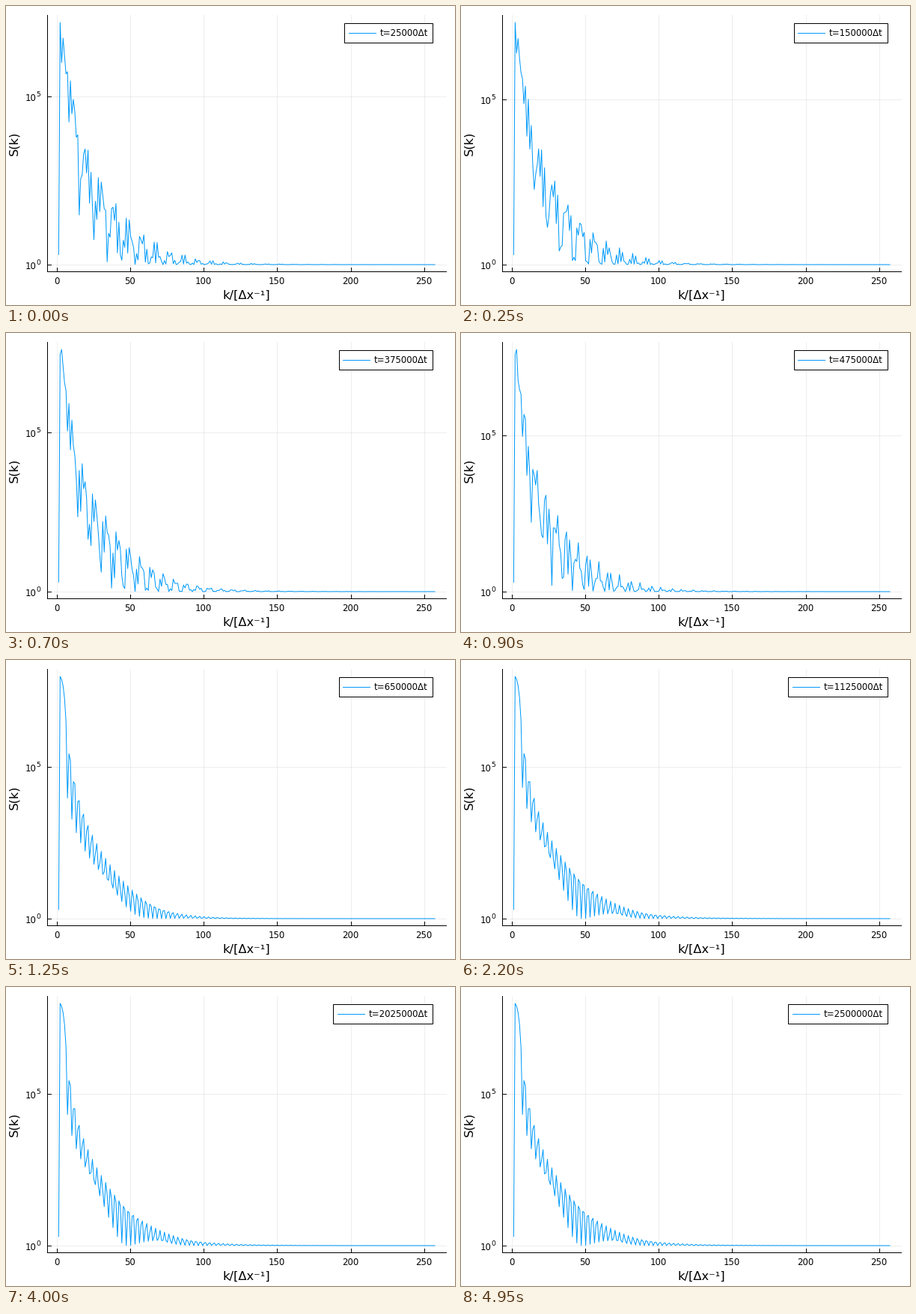
These frames come from a looping animation (600 by 400 pixels, 5 s). A matplotlib script:

```python
import numpy as np
import matplotlib.pyplot as plt
from matplotlib.animation import FuncAnimation
from matplotlib.patches import Rectangle

FRAMES, STEP = 100, 25000
LEFT, RIGHT, TOP, BOTTOM = 55.5, 588.5, 12, 355.5
BASE, PEAK = 346, 22            # y of S = 1 and of the largest S
SMALL, LARGE = 8.5, 11.7        # font sizes
PX = 0.72                       # one pixel in points
BLUE = "#009afa"

k = np.arange(1, 258)
m = np.arange(1, 257)           # modes above the mean
log_m = np.log10(m)


def log_spectrum(power, peak):
    """log10 S for mode powers scaled so that the largest is 10**peak."""
    power = power * 10 ** peak / power.max()
    return np.log10(1 + np.concatenate([[1], power]))


def cluster(i):
    """Drops that widen and approach each other: lobes cut by fast teeth."""
    width = 9.4 - 0.0627 * i - 0.00353 * i ** 2
    gap = 0.577 - 0.0031 * i - 0.000506 * i ** 2
    phase = 0.577 - 0.0092 * i - 0.00215 * i ** 2
    lobes = np.sin(np.pi * (m / width - 0.553 - 0.0045 * i)) ** 2
    teeth = np.cos(np.pi * (m * gap - phase)) ** 2
    lobes += 0.01 + np.exp(-(m / 6) ** 2)
    teeth += 0.03 + np.exp(-m ** 2)
    peak = 7.2 + 0.031 * i
    fall = 10.88 - 0.0128 * i - 5.4 * log_m
    envelope = 1 / (10 ** -peak + 10 ** -fall)
    return log_spectrum(envelope * lobes * teeth, peak)


def droplet(settled):
    """A single raised-cosine drop with a slightly rough edge."""
    u = m / (3.045 + 0.02 * settled)
    bump = np.sin(np.pi * u) / (u * (1 - u ** 2))
    edge = 0.76 * log_m * m ** 2 / (m ** 2 + 6)
    damping = 0.003 * (1 - settled) * m
    return log_spectrum(bump ** 2 * 10 ** (edge - damping), 8)


def log_s(i):
    merge = np.clip((i - 18) / 6, 0, 1)
    settled = np.clip((i - 25) / 17, 0, 1)
    if merge == 1:
        return droplet(settled)
    return (1 - merge) * cluster(i) + merge * droplet(settled)


def x_px(value):
    return 68.4 + 1.9636 * value


fig = plt.figure(figsize=(6, 4), dpi=100, facecolor="white")
plt.rcParams["font.family"] = "DejaVu Sans"
ax = fig.add_axes([0, 0, 1, 1])
ax.set_xlim(0, 600)
ax.set_ylim(400, 0)
ax.axis("off")


def stroke(xs, ys, color="black", **kw):
    return ax.plot(xs, ys, color=color, lw=PX, **kw)[0]


def rule(x0, y0, x1, y1, **kw):
    """Straight line; the half pixel offsets the renderer's snapping."""
    return stroke([x0 - 0.5, x1 - 0.5], [y0 - 0.5, y1 - 0.5], **kw)


def grid_rule(x0, y0, x1, y1):
    return rule(x0, y0, x1, y1, alpha=0.065, zorder=1)


def label(x, y, text, size=SMALL, **kw):
    return ax.text(x, y, text, fontsize=size, **kw)


def power_label(exponent, y):
    return (label(41, y + 5.5, "10", ha="right"),
            label(40.5, y - 0.5, exponent, 6.6))


for value in range(0, 251, 50):
    x = x_px(value)
    grid_rule(x, TOP, x, BOTTOM)
    rule(x, BOTTOM - 5, x, BOTTOM)
    label(x - 0.8, 371.5, str(value), ha="center")

grid_rule(LEFT, BASE, RIGHT, BASE)
rule(LEFT, BASE, LEFT + 5, BASE)
power_label("0", BASE)

grid5 = grid_rule(LEFT, BASE, RIGHT, BASE)
tick5 = rule(LEFT, BASE, LEFT + 5, BASE)
ten5, exp5 = power_label("5", BASE)

rule(LEFT, TOP, LEFT, BOTTOM)
rule(LEFT, BOTTOM, RIGHT, BOTTOM)
label(321.5, 392, "k/[Δx⁻¹]", LARGE, ha="center")
label(18, 184, "S(k)", LARGE, rotation=90, ha="right", va="center")

curve = stroke(x_px(k), np.full(k.size, BASE), BLUE, zorder=3,
               solid_joinstyle="round")

box = Rectangle((452, 23), 118, 25.5, fc="white", ec="black", lw=PX,
                zorder=4)
ax.add_patch(box)
key = rule(458, 36.5, 494, 36.5, color=BLUE, zorder=5)
caption = label(499.5, 40.5, "", zorder=5)


def draw(i):
    logs = log_s(i)
    decade = (BASE - PEAK) / logs.max()
    curve.set_ydata(BASE - decade * logs)

    y5 = BASE - 5 * decade
    for line in (grid5, tick5):
        line.set_ydata([y5 - 0.5, y5 - 0.5])
    ten5.set_y(y5 + 5.5)
    exp5.set_y(y5 - 0.5)

    steps = str(STEP * (i + 1))
    shift = 7.5 * (len(steps) - 5)
    box.set_x(452 - shift)
    box.set_width(118 + shift)
    key.set_xdata([457.5 - shift, 493.5 - shift])
    caption.set_x(499.5 - shift)
    caption.set_text(f"t={steps}Δt")
    return curve, grid5, tick5, ten5, exp5, box, key, caption


anim = FuncAnimation(fig, draw, frames=FRAMES, interval=50, repeat=True,
                     repeat_delay=0, blit=False)
plt.show()
```
